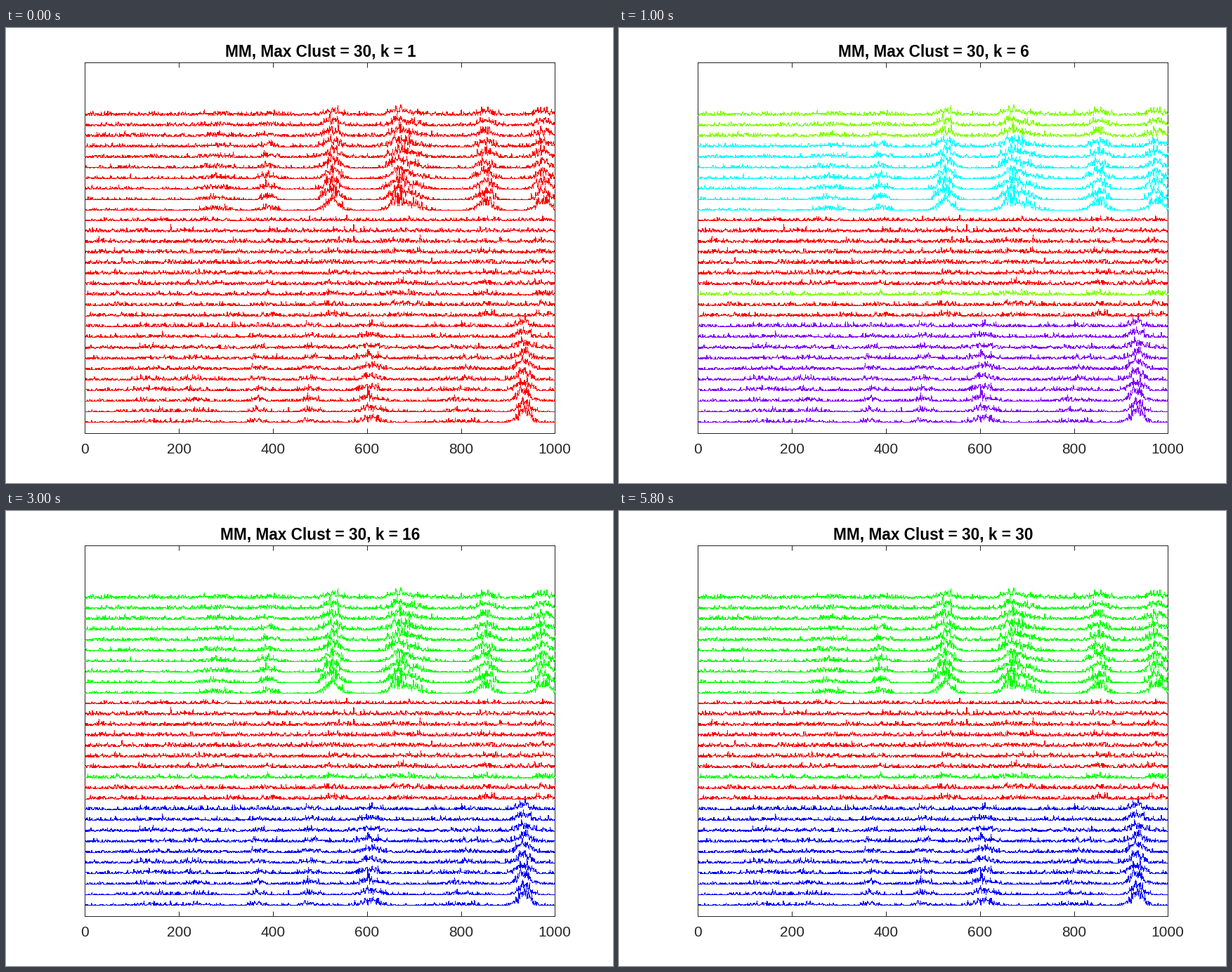
These frames come from a looping animation (864 px wide and 648 px high, 6 s). A matplotlib script:

```python
import colorsys

import numpy as np
import matplotlib.pyplot as plt
from matplotlib.animation import FuncAnimation

W, H, DPI = 864, 648, 150
FRAMES, INTERVAL = 30, 200
LEFT, BOTTOM, WIDE, HIGH = 112.3, 576.7, 669, 528  # plot box in pixels
STEP = 0.1  # height of one count, in row units
DARK = "#262626"

plt.rcParams["font.family"] = "Liberation Sans"

# Rate profiles as (centre, width, rate)
LOWER = [(145, 25, 1.1), (235, 25, 0.9), (368, 12, 1.9), (480, 14, 2.2),
         (607, 17, 4.6), (800, 30, 1.2), (934, 13, 10.5)]
UPPER = [(60, 110, 0.5), (278, 24, 2.4), (390, 13, 3.6), (526, 15, 10.5),
         (664, 14, 8.5), (692, 22, 5.5), (852, 14, 9.5), (975, 14, 10)]

# First k, cluster count, label of lower / middle / upper / faint rows,
# and the chance of a stray label in each third
STAGES = [
    (1, 1, (0, 0, 0, 0), (0, 0, 0)),
    (2, 11, (0, 0, 0, 0), (0.5, 0.5, 0.5)),
    (3, 11, (6, 2, 0, 0), (0.4, 0.6, 0.4)),
    (4, 9, (5, 7, 3, 2), (0, 0.8, 0)),
    (5, 5, (3, 0, 2, 1), (0, 0.2, 0)),
    (6, 4, (3, 0, 2, 1), (0, 0, 0)),
    (9, 3, (2, 0, 1, 1), (0, 0, 0)),
]


def rate(x, peaks):
    return sum(a * np.exp(-0.5 * ((x - c) / s) ** 2) for c, s, a in peaks)


def make_trace(row, rng):
    """Poisson counts whose peaks fade towards the top of each third."""
    x = np.arange(1, 1001)
    third, i = divmod(row - 1, 10)
    peaks = LOWER if third == 0 else UPPER
    mix = (1 - 0.065 * i, 0.13 - 0.01 * i, 1 - 0.07 * i)[third]
    noise = (0.3 + 0.9 * (1 - mix), 1.0, 0.1 + 1.2 * (1 - mix))[third]
    return x, row + STEP * rng.poisson(mix * rate(x, peaks) + noise)


def pixel_spans(x, y):
    """Top and bottom pixel that a one-pixel line covers in each column."""
    xs = np.linspace(x[0], x[-1], 20000)
    cols = np.floor(LEFT + WIDE * xs / 1000).astype(int)
    rows = np.floor(BOTTOM - HIGH / 35 * np.interp(xs, x, y)).astype(int)
    top, bottom = np.full(W, H), np.zeros(W, int)
    np.minimum.at(top, cols, rows)
    np.maximum.at(bottom, cols, rows)
    used = np.arange(cols[0], cols[-1] + 1)
    edge = np.append(used, used[-1] + 1)
    top, bottom = top[used], bottom[used] + 1
    return edge, np.append(top, top[-1]), np.append(bottom, bottom[-1])


def row_colors(k):
    _, n, base, chance = [s for s in STAGES if s[0] <= k][-1]
    rng = np.random.default_rng(k)
    colors = []
    for row in range(1, 31):
        third = (row - 1) // 10
        faint = row >= 28 or row == 13
        label = base[3] if faint else base[third]
        if rng.random() < chance[third] and not (faint and k > 3):
            label = rng.integers(n)
        colors.append(colorsys.hsv_to_rgb(label / n, 1, 1))
    return colors


fig = plt.figure(figsize=(W / DPI, H / DPI), dpi=DPI, facecolor="white")

ax = fig.add_axes([LEFT / W, 1 - BOTTOM / H, WIDE / W, HIGH / H])
ax.set(xlim=(0, 1000), xticks=range(0, 1001, 200), yticks=[])
ax.tick_params(axis="x", direction="in", top=True, length=3.2, width=0.48,
               pad=6.8, color=DARK, labelcolor=DARK, labelsize=10)
for spine in ax.spines.values():
    spine.set(color=DARK, linewidth=0.48)

stage = fig.add_axes([0, 0, 1, 1], zorder=2)
stage.set(xlim=(0, W), ylim=(H, 0))
stage.axis("off")

rng = np.random.default_rng(7)
traces = [stage.fill_between(*pixel_spans(*make_trace(row, rng)),
                             step="post", linewidth=0, snap=False)
          for row in range(1, 31)]
title = fig.text(447.5 / W, 1 - 40 / H, "", ha="center", va="baseline",
                 fontsize=10.85, fontweight="bold", color="black")


def update(frame):
    k = frame + 1
    for trace, color in zip(traces, row_colors(k)):
        trace.set_facecolor(color)
    title.set_text(f"MM, Max Clust = 30, k = {k}")
    return [*traces, title]


anim = FuncAnimation(fig, update, frames=FRAMES, interval=INTERVAL,
                     repeat=True, repeat_delay=0)
plt.show()
```
